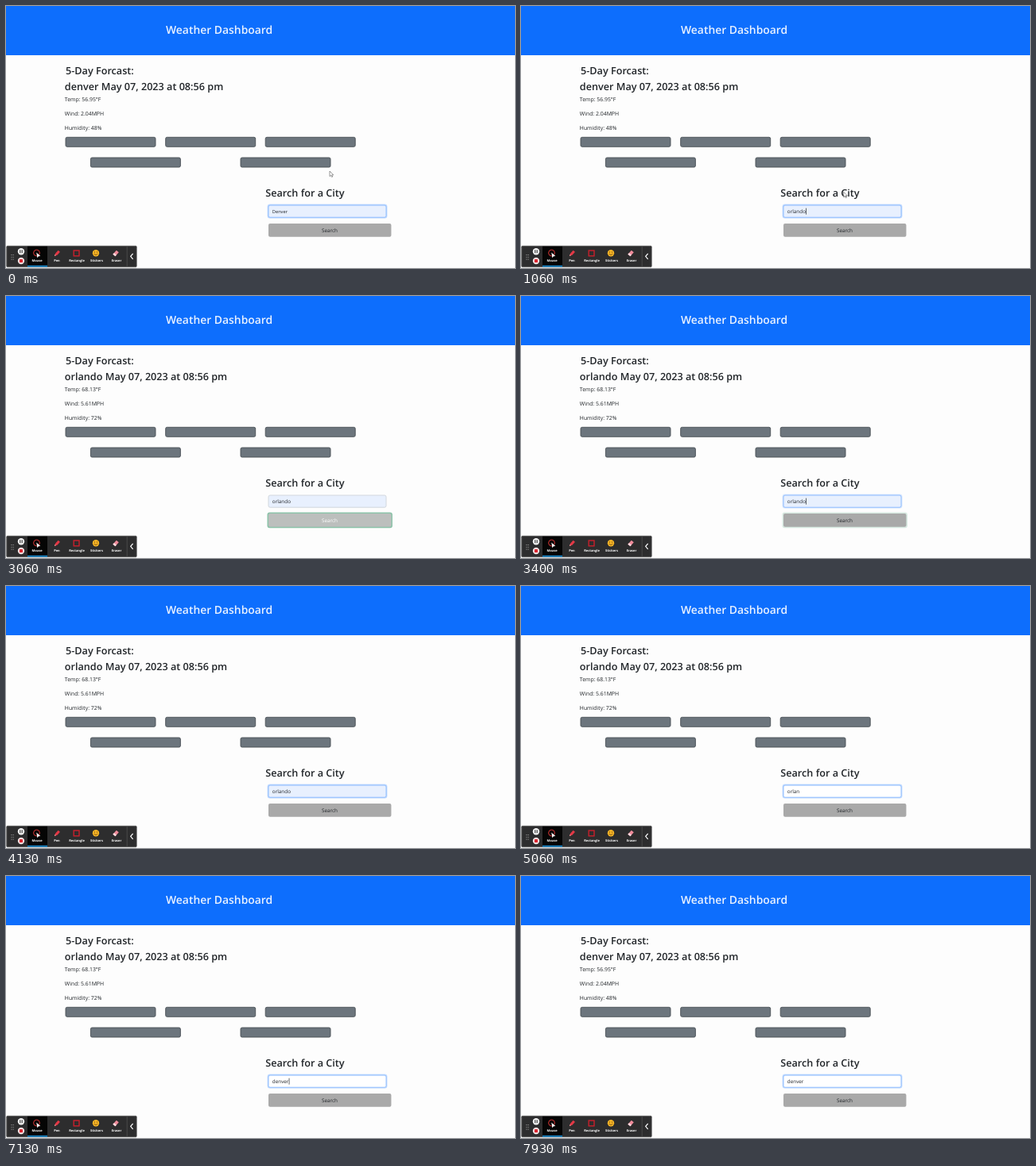
An HTML page that plays this animation: 640x330 px, repeating every 8000 ms.

```html
<!DOCTYPE html>
<html lang="en">
<head>
<meta charset="utf-8">
<title>Weather Dashboard</title>
<style>
  html, body { margin: 0; width: 100%; height: 100%; overflow: hidden; background: #fdfdfd; }
  svg { display: block; width: 640px; height: 330px; }
  text { font-family: "Open Sans", "Noto Sans", sans-serif; fill: #212529; text-rendering: geometricPrecision; }
  .title { font-size: 13.9px; font-weight: 600; fill: #eaf2ff; }
  .heading { font-size: 12.65px; font-weight: 600; }
  .body { font-size: 6.9px; }
  .field { font-size: 6.35px; }
  .tools text { font-size: 4px; font-weight: 700; fill: #fff; text-anchor: middle; }
  .card { fill: #6c757d; stroke: #484e54; stroke-width: .9; }
</style>
</head>
<body>
<svg viewBox="0 0 640 330">
  <rect width="640" height="330" fill="#fdfdfd"/>
  <rect width="640" height="62" fill="#0d6efd"/>
  <text class="title" x="201" y="35.4">Weather Dashboard</text>

  <text class="heading" x="75" y="85.5">5-Day Forcast:</text>
  <text class="heading" id="place" x="73.8" y="105.5"></text>
  <g class="body">
    <text id="temp" x="73.8" y="120"></text>
    <text id="wind" x="73.8" y="137.8"></text>
    <text id="humidity" x="73.8" y="155.5"></text>
  </g>
  <g id="cards"></g>

  <text class="heading" x="326.3" y="240">Search for a City</text>
  <rect id="inputGlow" x="328.6" y="249.6" width="150.8" height="18" rx="3" fill="#c2dbfe"/>
  <rect id="input" x="330" y="251" width="148" height="15.2" rx="2" stroke-width=".9"/>
  <text class="field" id="query" x="334.8" y="261"></text>
  <rect id="caret" y="254.6" width=".7" height="8" fill="#212529"/>

  <rect id="buttonGlow" x="328.5" y="272.5" width="157.4" height="19.8" rx="3" fill="#8cc3a9"/>
  <rect id="button" x="330" y="274" width="154.4" height="16.8" rx="2"/>
  <text class="field" id="label" x="407" y="285" text-anchor="middle">Search</text>

  <g class="tools">
    <rect x=".8" y="302.3" width="163.4" height="26.4" rx="1" fill="#2d2d2e" stroke="#555" stroke-width=".8"/>
    <rect x="27" y="302.8" width="25" height="25.4" fill="#050505"/>
    <rect x="27" y="326.8" width="25" height="1.8" fill="#168ad0"/>
    <path d="M7 313v7M9.2 313v7" stroke="#aaa" stroke-width="1" stroke-dasharray="1 1.8"/>
    <circle cx="19" cy="309.3" r="4.2" fill="#f4f4f4"/>
    <path d="M17.8 307.3v4M20.2 307.3v4" stroke="#333" stroke-width="1.1"/>
    <circle cx="19" cy="321" r="4.2" fill="#f1dfdf"/>
    <rect x="17" y="319" width="4" height="4" rx=".6" fill="#dd2732"/>
    <circle cx="38.5" cy="311" r="3.9" fill="none" stroke="#d93636" stroke-width="1"/>
    <path d="M38.3 310.5l5 4.6-2.4.2-1.5 2z" fill="#fff"/>
    <path d="M61 315l1-3.3 3.6-4 2.4 2-3.6 4z" fill="#e33845"/>
    <path d="M61 315l.6-2 1.2 1.1z" fill="#fbb"/>
    <rect x="85.2" y="308" width="6.8" height="6.8" fill="none" stroke="#c9202c" stroke-width="1.4"/>
    <circle cx="113" cy="311.3" r="4.2" fill="#f6b526"/>
    <path d="M111.5 309.3v1.4M114.5 309.3v1.4M110.7 312.3q2.3 2.5 4.6 0" fill="none" stroke="#70430c" stroke-width=".8"/>
    <path d="M134.4 312.7l4.4-5 3 2.5-4.4 5z" fill="#f08b9b"/>
    <path d="M134.4 312.7l1.5-1.7 3 2.5-1.5 1.7z" fill="#f8dde1"/>
    <path d="M152.2 303v25" stroke="#575757" stroke-width=".7"/>
    <path d="M159.6 311.8l-2.9 3.5 2.9 3.5" fill="none" stroke="#fff" stroke-width="1.2"/>
    <text x="39" y="322">Mouse</text>
    <text x="64" y="322">Pen</text>
    <text x="89" y="322">Rectangle</text>
    <text x="114" y="322">Stickers</text>
    <text x="139" y="322">Eraser</text>
  </g>

  <circle id="ring" cx="405" cy="280" r="11.5" fill="none" stroke="#d93a3a" stroke-width="1.2"/>
  <g id="pointer" stroke="#555" stroke-width=".6" stroke-linejoin="round" fill="#fff">
    <path id="arrow" d="M0 0v6.6l1.6-1.4 1.1 2.3 1-.5-1-2.2h2z"/>
    <path id="hand" d="M-.7 0q.8-.9 1.5 0v3l2.6.7q.6.3.4 1.2l-.6 3.1h-3.6l-2.4-3.2q.2-1 1.3-.3l.8.6z"/>
  </g>
</svg>
<script>
const LOOP = 8000;
const el = id => document.getElementById(id);
const clamp = v => Math.min(1, Math.max(0, v));
const ramp = (t, start, length = 150) => clamp((t - start) / length);
const ease = v => v * v * (3 - 2 * v);
const show = (id, opacity) => el(id).setAttribute("opacity", Number(opacity));
const write = (id, text) => { if (el(id).textContent !== text) el(id).textContent = text; };

const cities = {
  denver: { temp: "56.95", wind: "2.04", humidity: 48 },
  orlando: { temp: "68.13", wind: "5.61", humidity: 72 }
};
const reports = [[0, "denver"], [2250, "orlando"], [7350, "denver"]];
const keys = [
  [0, "Denver"], [300, "orlando"], [700, "orlando"], [3300, "orlando"],
  [4420, "orland"], [4520, "orlan"], [5220, "orla"], [5350, "orl"],
  [5480, "or"], [5600, "o"], [5720, ""], [5950, "d"], [6150, "de"],
  [6350, "den"], [6520, "denv"], [6700, "denve"], [6880, "denver"], [7250, "denver"]
];
const path = [[0, 407, 208], [300, 406, 214], [850, 406, 216], [1450, 405, 280], [LOOP, 405, 280]];
const BLUR = 1800, REFOCUS = 3300, EDIT = 4420, HOVER = 1380, CLICKS = [700, 1800];

const latest = (track, t) => track.filter(([start]) => start <= t).pop();

function pointerAt(t) {
  const i = path.findIndex(([end]) => end > t);
  const [t0, x0, y0] = path[i - 1], [t1, x1, y1] = path[i];
  const k = ease((t - t0) / (t1 - t0));
  return [x0 + (x1 - x0) * k, y0 + (y1 - y0) * k];
}

function drawReport(t) {
  const name = latest(reports, t)[1], city = cities[name];
  write("place", `${name} May 07, 2023 at 08:56 pm`);
  write("temp", `Temp: ${city.temp}°F`);
  write("wind", `Wind: ${city.wind}MPH`);
  write("humidity", `Humidity: ${city.humidity}%`);
}

function drawInput(t) {
  const [since, text] = latest(keys, t);
  const focused = t < BLUR || t >= REFOCUS;
  const preview = t < 700;
  write("query", text);
  el("query").style.fontSize = preview ? "5.7px" : "";
  show("inputGlow", t < REFOCUS ? 1 - ramp(t, BLUR) : ramp(t, REFOCUS));
  el("input").setAttribute("fill", t < EDIT ? "#e8f0fe" : "#fff");
  el("input").setAttribute("stroke", focused ? "#86b7fe" : "#ced4da");
  el("caret").setAttribute("x", 335 + el("query").getComputedTextLength());
  show("caret", focused && !preview && (t - since) % 1000 < 500);
}

function drawButton(t) {
  const hot = t >= HOVER && t < REFOCUS;
  const pressed = t >= BLUR && t < 2100;
  el("button").setAttribute("fill", pressed ? "#cbcbcb" : hot ? "#bcbfbd" : "#a9a9a9");
  el("label").style.fill = hot ? "#fff" : "#212529";
  show("buttonGlow", ramp(t, BLUR, 100) * (1 - ramp(t, REFOCUS)));
}

function drawPointer(t) {
  const [x, y] = pointerAt(t);
  const click = CLICKS.find(start => t >= start && t < start + 300);
  el("pointer").setAttribute("transform", `translate(${x} ${y})`);
  show("pointer", t < 2700);
  show("arrow", t < HOVER);
  show("hand", t >= HOVER);
  show("ring", click !== undefined);
  el("ring").setAttribute("cx", x);
  el("ring").setAttribute("cy", y - .5);
}

el("cards").innerHTML = [[75, 165], [200.7, 165], [326.2, 165], [106.4, 190.7], [295, 190.7]]
  .map(([x, y]) => `<rect class="card" x="${x}" y="${y + .3}" width="113" height="12" rx="1.8"/>`).join("");

const begin = performance.now();
function frame() {
  const t = (performance.now() - begin) % LOOP;
  drawReport(t);
  drawInput(t);
  drawButton(t);
  drawPointer(t);
  requestAnimationFrame(frame);
}
frame();
</script>
</body>
</html>
```
